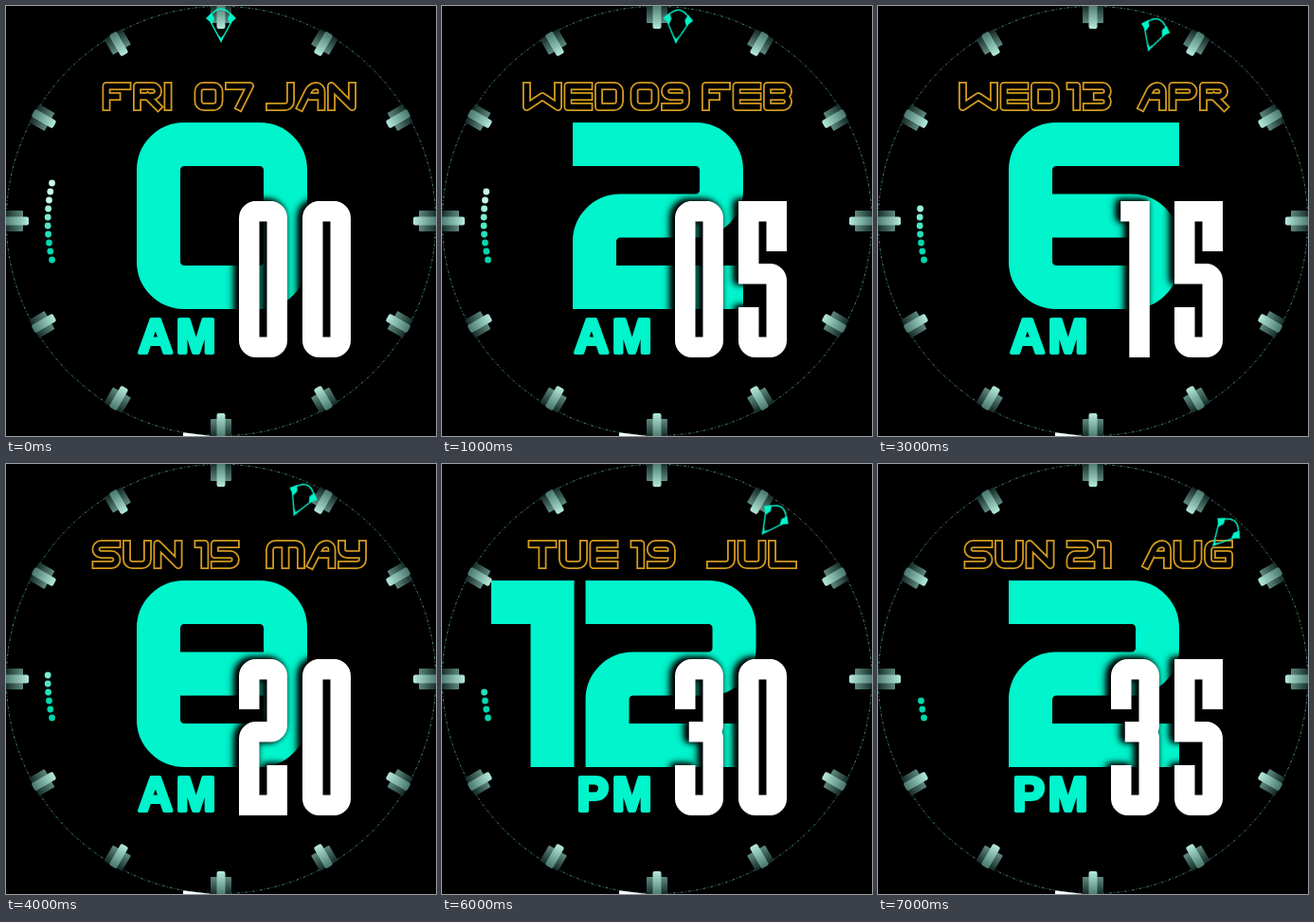
Recreate the animation shown at these times as an HTML page. Size 454 by 454 pixels, loop 8000 ms.

```html
<!DOCTYPE html>
<html lang="en">
<head>
<meta charset="utf-8">
<title>Watch face</title>
<style>
  html, body { margin: 0; width: 100%; height: 100%; overflow: hidden; background: #000; }
  svg { display: block; width: 454px; height: 454px; }
  .frame { visibility: hidden; animation: show 8s step-end infinite; }
  @keyframes show { 0% { visibility: visible; } 12.5%, 100% { visibility: hidden; } }
  #pointer { transform-origin: 227px 227px; animation: turn 8s steps(8) infinite; }
  @keyframes turn { to { transform: rotate(48deg); } }
  #cover { animation: drain 8s steps(8) infinite; }
  @keyframes drain { to { transform: translateY(72px); } }
  .glyph { fill: none; stroke-linecap: square; }
  .hour { stroke: #00f5cc; }
  .minute { stroke: #fff; filter: drop-shadow(-3px -1px 3px #000) drop-shadow(-2px 0 3px #000); }
  .gold { stroke: #d29a1e; stroke-linejoin: round; }
  .core { stroke: #000; stroke-linejoin: round; }
  .half {
    font: 700 50px "Liberation Sans", Arial, sans-serif; letter-spacing: 4px; text-anchor: end;
    fill: #00f5cc; stroke: #00f5cc; stroke-width: 4; stroke-linejoin: round;
  }
</style>
</head>
<body>
<svg viewBox="0 0 454 454">
  <defs>
    <linearGradient id="bar" x2="0" y2="1">
      <stop offset="0" stop-color="#47756b"/>
      <stop offset="1" stop-color="#b4eadb"/>
    </linearGradient>
    <linearGradient id="side" x2="0" y2="1">
      <stop offset="0" stop-color="#142a26"/>
      <stop offset="1" stop-color="#5f8a80"/>
    </linearGradient>
    <g id="mark">
      <rect x="-11" y="-228" width="22" height="19" rx="1" fill="url(#side)"/>
      <rect x="-4.5" y="-229" width="9" height="26" rx="2" fill="url(#bar)"/>
    </g>
  </defs>
  <rect width="454" height="454"/>
  <path d="M187 450.3L217 454H187Z" fill="#fff"/>
  <circle cx="227" cy="227" r="226.7" fill="none" stroke="#62b8a0" stroke-width=".7" stroke-dasharray="3 2 1 2"/>
  <g id="dots"></g>
  <rect id="cover" x="38" y="119.5" width="16" height="63"/>
  <g id="marks"></g>
  <g id="frames"></g>
  <g id="pointer" fill="#00f5cc">
    <path d="M214 13L227 37L240 13M216 10Q227 -4 238 10" fill="none" stroke="#00f5cc" stroke-width="1.4"/>
    <path d="M211 13L217 7L220 13L218 19ZM243 13L237 7L234 13L236 19ZM224 30L227 39L230 30L227 34Z"/>
  </g>
</svg>
<script>
const $ = id => document.getElementById(id);
const repeat = (n, fn) => Array.from({ length: n }, (_, i) => fn(i)).join('');

// Strokes on a grid of 3 columns and 5 rows, named a to o row by row.
// A capital rounds the corner.
const glyphs = {
  0: 'bCOMAb', 1: 'aco', 2: 'aCIGmo', 3: 'aCIh hIOm', 4: 'aGi co', 5: 'cagIOm',
  6: 'cAMOIg', 7: 'acn', 8: 'bCOMAb gi', 9: 'iGACOm',
  A: 'mBCo hi', B: 'gaCIgmOIg', D: 'bCOmab', E: 'camo gi', F: 'mac gh', G: 'cAMoih',
  I: 'am', J: 'cOm', L: 'amo', M: 'mACo bn', N: 'maoc', P: 'maCIg', R: 'maCIg ho',
  S: 'cAGIOm', T: 'ac bn', U: 'aMOc', W: 'amhoc', Y: 'aGi cOm'
};
const hooked = { ...glyphs, 2: 'dACIGmol', 3: 'dACIh hIOMj', 5: 'fcagIOMj' };
const spans = { 1: .31, I: 0, M: 1.5, W: 1.5 };

// w, h: size of the centre line; t: thickness; r: corner radius; mid: height of the middle bar
const hourFont = { set: glyphs, w: 134, h: 151, t: 46, r: 27, mid: .5, gap: 12 };
const minuteFont = { set: hooked, w: 29.5, h: 143.5, t: 21.5, r: 7, mid: .46 };
const dateFont = { set: glyphs, w: 22, h: 22, t: 9, r: 6, mid: .5, gap: 1.5 };

const inner = (c, f) => f.w * (spans[c] ?? 1);

function trace(c, f) {
  const rows = [0, .22, f.mid, .78, 1];
  return f.set[c].split(' ').map(stroke => {
    const pts = [...stroke].map(k => {
      const n = k.toLowerCase().charCodeAt(0) - 97;
      return { x: n % 3 / 2 * inner(c, f), y: rows[Math.floor(n / 3)] * f.h, round: k < 'a' };
    });
    return pts.map((p, i) => {
      const a = pts[i - 1], b = pts[i + 1];
      if (!p.round) return `${i ? 'L' : 'M'}${p.x} ${p.y}`;
      const dist = q => Math.hypot(q.x - p.x, q.y - p.y);
      const r = Math.min(f.r, dist(a) / 2, dist(b) / 2);
      const toward = (q, d) => `${p.x + (q.x - p.x) * d / dist(q)} ${p.y + (q.y - p.y) * d / dist(q)}`;
      return `L${toward(a, r)}C${toward(a, r * .45)} ${toward(b, r * .45)} ${toward(b, r)}`;
    }).join('');
  }).join('');
}

function glyph(c, f, x, y, cls = '', t = f.t) {
  return `<path class="glyph ${cls}" stroke-width="${t}" d="${trace(c, f)}"
    transform="translate(${x + f.t / 2} ${y + f.t / 2})"/>`;
}

const advance = (c, f) => inner(c, f) + f.t + f.gap;
const wordWidth = (s, f) => [...s].reduce((sum, c) => sum + advance(c, f), -f.gap);

function word(s, f, x, y, draw = glyph) {
  return [...s].map(c => {
    const path = draw(c, f, x, y);
    x += advance(c, f);
    return path;
  }).join('');
}

const outlined = (c, f, x, y) => glyph(c, f, x, y, 'gold') + glyph(c, f, x, y, 'core', f.t - 3.6);

// Minute digits sit in equal cells.
function cell(c, x) {
  return glyph(c, minuteFont, x + (minuteFont.w - inner(c, minuteFont)) / 2, 206);
}

function frame(_, i) {
  const date = new Date(Date.UTC(2022, i, 7 + 2 * i));
  const name = opt => date.toLocaleString('en-US', { ...opt, timeZone: 'UTC' }).toUpperCase();
  const day = name({ weekday: 'short' }), month = name({ month: 'short' });
  const num = String(date.getUTCDate()).padStart(2, '0');
  const h = 2 * i, hour = String(h > 12 ? h - 12 : h);
  const min = String(5 * i).padStart(2, '0');
  const dateWord = (s, x) => word(s, dateFont, x, 80, outlined);
  return `<g class="frame" style="animation-delay:${i ? i - 8 : 0}s">
    <g role="img" aria-label="${day} ${num} ${month}">
      ${dateWord(day, 138.5 - wordWidth(day, dateFont) / 2)}
      ${dateWord(num, 198.5)}${dateWord(month, i < 5 ? 274 : 279)}</g>
    <g class="hour" role="img" aria-label="${hour}">${word(hour, hourFont, hour.length > 1 ? 52 : 138, 123)}</g>
    <text class="half" x="225.5" y="366">${h < 12 ? 'AM' : 'PM'}</text>
    <g class="minute" role="img" aria-label="${min}">${cell(min[0], 246)}${cell(min[1], 313)}</g>
  </g>`;
}

$('marks').innerHTML = repeat(12, i => `<use href="#mark" transform="translate(227 227) rotate(${i * 30})"/>`);
$('dots').innerHTML = repeat(10, i => {
  const k = Math.min(1, Math.max(0, (i - 2) / 5));
  const x = 44.1 + .22 * (i - 4.5) ** 2;
  return `<circle cx="${x}" cy="${187 + i * 9}" r="3.4" fill="rgb(${200 * (1 - k)},${250 - 35 * k},${232 - 58 * k})"/>`;
});
$('frames').innerHTML = Array.from({ length: 8 }, frame).join('');
</script>
</body>
</html>
```
